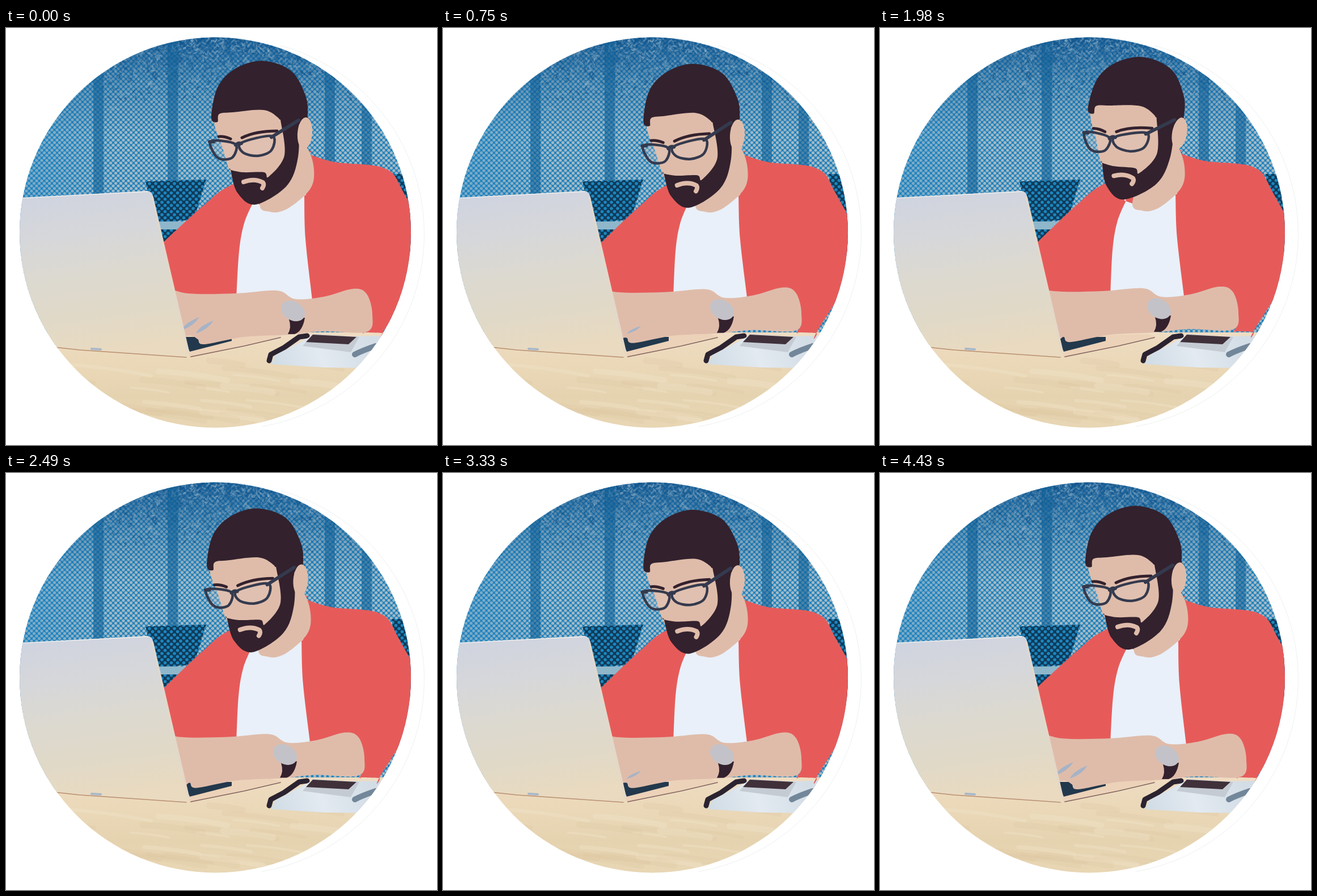
An HTML page with a canvas for the animation above (4530 ms loop, 760x737 px).

```html
<!DOCTYPE html>
<html lang="en">
<head>
<meta charset="utf-8">
<title>Man typing on a laptop</title>
<style>
html, body { margin: 0; width: 100%; height: 100%; overflow: hidden; background: #fff; }
canvas { display: block; }
</style>
</head>
<body>
<canvas id="stage" width="760" height="737"></canvas>
<script>
const W = 760, H = 737, LOOP = 4530, TAU = Math.PI * 2;
const SKIN = '#dfbcaa', HAIR = '#33212d', RED = '#e65b5a', FRAME = '#343a4e';
const stage = document.getElementById('stage').getContext('2d');

function layer(w, h) {
  const c = document.createElement('canvas');
  c.width = w;
  c.height = h;
  return c.getContext('2d');
}

let seed = 7;
function rand(lo, hi) {
  seed = (seed * 16807) % 2147483647;
  return lo + (hi - lo) * seed / 2147483647;
}

// Closed curve through the points; a repeated point makes a corner.
function curve(...p) {
  const n = p.length / 2, path = new Path2D();
  const x = i => p[((i + n) % n) * 2], y = i => p[((i + n) % n) * 2 + 1];
  path.moveTo(x(0), y(0));
  for (let i = 0; i < n; i++) {
    path.bezierCurveTo(
      x(i) + (x(i + 1) - x(i - 1)) / 6, y(i) + (y(i + 1) - y(i - 1)) / 6,
      x(i + 1) - (x(i + 2) - x(i)) / 6, y(i + 1) - (y(i + 2) - y(i)) / 6,
      x(i + 1), y(i + 1));
  }
  path.closePath();
  return path;
}

function fill(g, path, color) {
  g.fillStyle = color;
  g.fill(typeof path === 'string' ? new Path2D(path) : path);
}

function line(g, path, color, width) {
  g.strokeStyle = color;
  g.lineWidth = width;
  g.stroke(typeof path === 'string' ? new Path2D(path) : path);
}

function oval(g, x, y, rx, ry, turn, color) {
  g.beginPath();
  g.ellipse(x, y, rx, ry, turn, 0, TAU);
  g.fillStyle = color;
  g.fill();
}

function shade(g, x0, y0, x1, y1, ...stops) {
  const s = g.createLinearGradient(x0, y0, x1, y1);
  stops.forEach((c, i) => s.addColorStop(i / (stops.length - 1), c));
  return s;
}

function mesh(base, dot, size, r) {
  const g = layer(size, size);
  g.fillStyle = base;
  g.fillRect(0, 0, size, size);
  oval(g, size / 2, size / 2, r, r, 0, dot);
  for (let i = 0; i < 4; i++) oval(g, i % 2 * size, (i >> 1) * size, r, r, 0, dot);
  return g.createPattern(g.canvas, 'repeat');
}

function clipDisc(g) {
  g.beginPath();
  g.arc(369, 361.5, 345, 0, TAU);
  g.clip();
}

function drawWall(g) {
  g.fillStyle = mesh('#1f82bd', '#a4b9c4', 9, 2.6);
  g.fillRect(0, 0, W, 560);
  g.fillStyle = shade(g, 60, 0, 200, 0, 'rgba(30,135,200,.3)', 'rgba(30,135,200,0)');
  g.fillRect(0, 0, 200, 400);
  g.fillStyle = shade(g, 0, 17, 0, 190, 'rgba(12,82,142,.8)', 'rgba(18,92,150,.35)', 'rgba(18,92,150,0)');
  g.fillRect(0, 0, W, 190);
  for (let i = 0; i < 1200; i++) {
    const y = 17 + rand(0, 1) * rand(0, 140), x = rand(170, 650);
    line(g, `M${x} ${y}l${rand(-6, 6)} ${rand(-6, 6)}`,
      i % 2 ? 'rgba(150,180,200,.4)' : 'rgba(16,84,140,.5)', 2.4);
  }
  for (const x of [154, 285, 562, 627]) {
    g.fillStyle = 'rgba(17,98,152,.6)';
    g.fillRect(x, 0, 18, 345);
  }
  const chair = mesh('#103a58', '#1c86bf', 11, 2.8);
  fill(g, 'M246 271L353 268L331 339L262 343Z', chair);
  fill(g, 'M264 342H334L315 356H270Z', '#8fb7cb');
  fill(g, 'M270 356H318L300 390H276Z', chair);
  fill(g, 'M680 258H730V400H700Z', chair);
}

function drawDesk(g) {
  g.fillStyle = shade(g, 0, 538, 0, 706, '#efdcc2', '#ead8b8', '#e5d3b0', '#e8d6b4');
  g.fillRect(0, 538, W, 200);
  for (let i = 0; i < 26; i++) {
    const w = rand(50, 160);
    line(g, `M${rand(60, 520)} ${rand(585, 700)}q${w / 2} ${w * .03} ${w} ${w * .13}`,
      i % 2 ? 'rgba(241,228,203,.35)' : 'rgba(216,188,148,.18)', rand(4, 14));
  }
}

function drawNotebook(g) {
  line(g, 'M464 588L467 577L490 565L517 546L531 544', '#2b2330', 9);
  fill(g, 'M467 594L475 578L536 546L670 544L640 601L560 600Z',
    shade(g, 467, 600, 640, 545, '#cfdbe4', '#e3eaf1', '#d3dde6'));
  fill(g, 'M523 562L541 541L623 546L608 573Z', '#c5cbd3');
  fill(g, 'M529 555L541 542L618 546L604 559Z', '#3f303a');
  line(g, 'M615 577Q628 570 652 562', '#73879a', 10);
}

function drawBase(g) {
  fill(g, 'M310 545L470 541L487 545L325 583Z', '#ecd2b8');
  fill(g, 'M312 546H398V553L324 572Z', '#22384c');
  line(g, 'M326 581L420 562L484 547', '#80645f', 1.6);
}

function drawLid(g) {
  const lid = new Path2D('M0 302L248 288Q257 287 260 299L323 571Q325 582 318 583L130 569L0 556Z');
  fill(g, lid, shade(g, 110, 295, 150, 575, '#d0d4df', '#d6d7da', '#dcd9d0', '#e0d9c8', '#e9dac0'));
  line(g, 'M258 300L321 573', '#e3d8c9', 3);
  line(g, 'M20 301L250 289', '#eeeeee', 1.5);
  line(g, 'M84 564L130 569L318 582', '#b98f70', 1.6);
  line(g, 'M151 567L167 568', '#a9b8c8', 4);
}

const back = layer(W, H), front = layer(W, H);
back.fillStyle = '#fff';
back.fillRect(0, 0, W, H);
back.strokeStyle = '#edf2f2';
back.beginPath();
back.arc(392, 364, 345.5, -1.3, 1.4);
back.stroke();
for (const g of [back, front, stage]) g.lineCap = g.lineJoin = 'round';
clipDisc(back);
[drawWall, drawDesk, drawNotebook, drawBase].forEach(draw => draw(back));
clipDisc(front);
drawLid(front);

const jacket = curve(531, 222, 531, 222, 580, 237, 665, 247, 698, 285, 740, 400, 664, 539, 664, 539,
  630, 538, 630, 538, 600, 515, 270, 515, 276, 380, 276, 380, 348, 314, 400, 276);
const shirt = curve(436, 308, 436, 308, 480, 319, 526, 297, 526, 297, 528, 372, 540, 480, 540, 480,
  406, 480, 406, 480, 411, 395, 420, 345);
const neck = curve(500, 190, 531, 212, 543, 250, 536, 285, 497, 319, 466, 325, 449, 304);

const face = curve(370, 155, 383, 215, 400, 262, 440, 300, 500, 260, 512, 165, 440, 138);
const hair = curve(373, 166, 362, 158, 373, 105, 404, 72, 452, 58, 503, 76, 529, 122, 532, 160, 532, 160,
  500, 180, 484, 162, 455, 145, 400, 149, 376, 152);
const beard = curve(484, 162, 484, 162, 516, 163, 516, 163, 515, 228, 495, 279, 440, 312, 408, 291,
  396, 251, 396, 251, 418, 255, 455, 255, 463, 263, 491, 225);
const lenses = [
  curve(415, 203, 469, 191, 468, 216, 444, 226, 418, 220),
  curve(362, 200, 404, 205, 400, 228, 380, 232, 367, 222)
];

function drawTorso(g, k) {
  g.save();
  g.transform(1 - .025 * k.lean, 0, .01 * k.lean, 1, 5.3 * k.lean, k.rise);
  fill(g, jacket, RED);
  fill(g, shirt, '#e9f0f9');
  fill(g, neck, SKIN);
  g.restore();
}

function drawHead(g, k) {
  g.save();
  g.translate(533 + k.x, 187 + k.y);
  g.rotate(k.turn * TAU / 360);
  g.translate(-533, -187);
  fill(g, face, SKIN);
  fill(g, beard, HAIR);
  fill(g, hair, HAIR);
  oval(g, 527, 186, 13, 28, .08, SKIN);
  line(g, 'M419 272Q438 265 453 273Q456 277 452 283', SKIN, 8);
  line(g, 'M416 194Q440 182 478 182', HAIR, 5);
  line(g, 'M375 192Q385 191 396 196', HAIR, 5);
  for (const lens of lenses) {
    fill(g, lens, 'rgba(225,205,200,.2)');
    line(g, lens, FRAME, 4.5);
  }
  line(g, 'M405 207Q409 202 415 204M359 201L366 201M468 193L516 163', FRAME, 6);
  g.restore();
}

function drawArms(g, k) {
  const drop = 1 - k.lift;
  g.save();
  g.translate(-14 * k.lean, -2.3 * k.lean + k.rise * .8);
  fill(g, curve(250, 455, 320, 469, 405, 469, 478, 464, 510, 479, 560, 475, 612, 461, 636, 470, 646, 506,
    636, 537, 560, 536, 500, 542, 420, 546, 350, 559, 338, 550, 326, 544 + 10 * drop, 290, 540), SKIN);
  // Gaps between the fingers narrow as the hand closes.
  for (let i = 0; i < 2; i++) {
    const from = .55 - .4 * i, open = Math.max(0, (k.lift - from) / (1 - from));
    g.save();
    g.translate(327 + 25 * i, 525 + 6 * i + 10 * (1 - open));
    g.scale(.7 + .3 * open, Math.sqrt(open));
    fill(g, 'M-17 9Q-12 -4 14 -14Q4 2 -17 9Z', '#a6b3c6');
    g.restore();
  }
  fill(g, 'M499 515L527 512Q523 536 509 541L497 541Q504 530 499 515Z', HAIR);
  oval(g, 506, 500, 22.5, 16.5, .55, '#c3c2c8');
  g.restore();
}

function ramp(t, from, to) {
  const u = Math.min(1, Math.max(0, (t - from) / (to - from)));
  return u * u * (3 - 2 * u);
}

// Lean in, look up for a while, sink slowly, then sit back.
function pose(t) {
  const lean = ramp(t, 0, 600) - ramp(t, 3930, 4400);
  const look = ramp(t, 1050, 1460) - ramp(t, 2150, 2550);
  const sag = ramp(t, 2550, 3930) * lean;
  return {
    lean,
    x: -8 * lean + 9 * look,
    y: 3.6 * lean - 3 * look + 2 * sag,
    turn: -1.2 * lean + 6.7 * look - .5 * sag,
    rise: -2 * look,
    lift: 1 - .55 * ramp(t, 0, 600) - .45 * ramp(t, 1050, 1460) + ramp(t, 2550, 4200)
  };
}

function render(now) {
  const k = pose(now % LOOP);
  stage.drawImage(back.canvas, 0, 0);
  stage.save();
  clipDisc(stage);
  drawTorso(stage, k);
  drawHead(stage, k);
  drawArms(stage, k);
  stage.restore();
  stage.drawImage(front.canvas, 0, 0);
}

const start = performance.now();
function tick() {
  render(performance.now() - start);
  requestAnimationFrame(tick);
}
tick();
</script>
</body>
</html>
```
